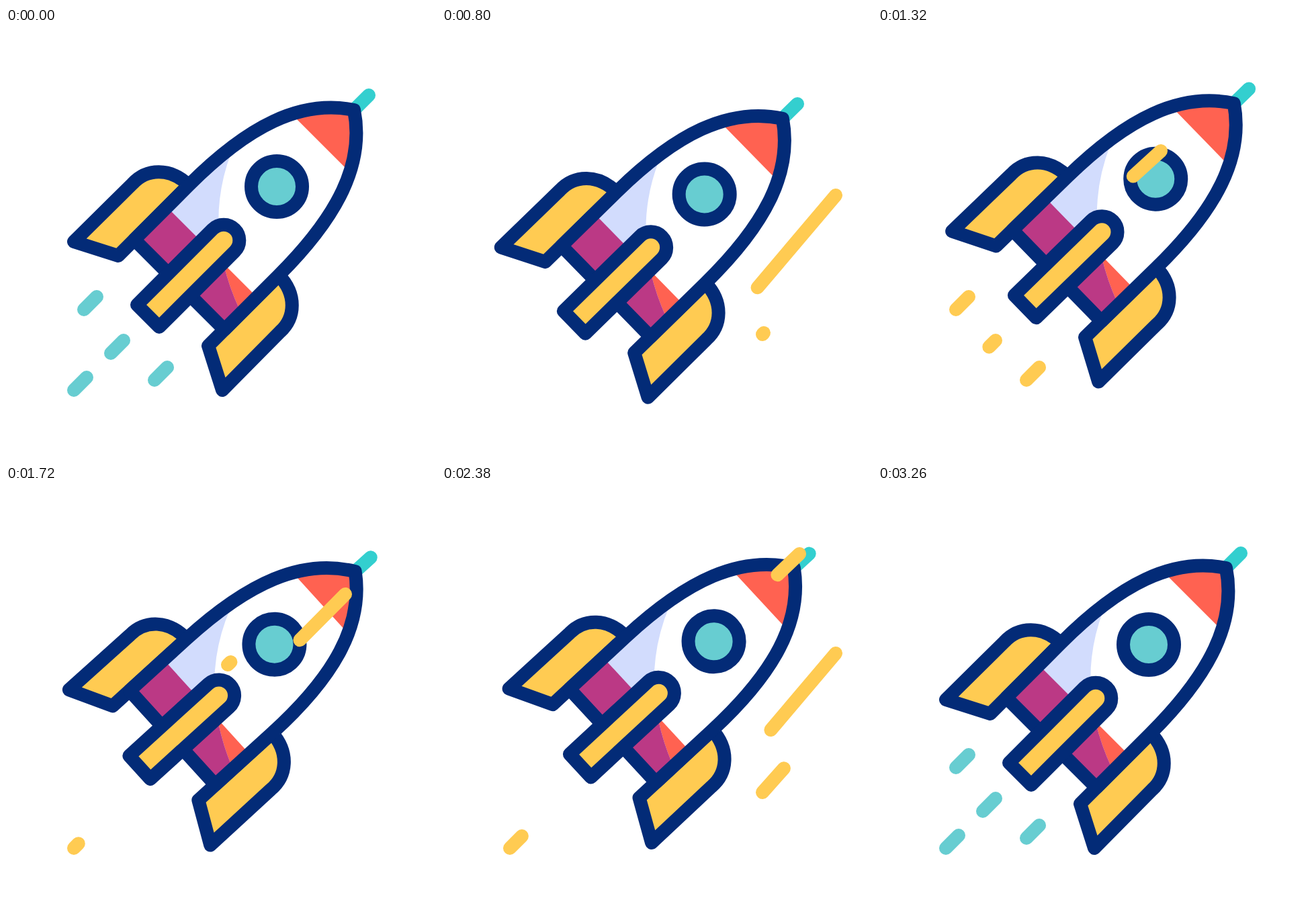
An HTML page for the animation above (3520 ms loop, 640 by 640 pixels).

```html
<!DOCTYPE html>
<html lang="en">
<head>
<meta charset="utf-8">
<title>Rocket</title>
<style>
  html, body { margin: 0; width: 100%; height: 100%; overflow: hidden; background: #fff; }
  svg { display: block; width: 100vw; height: 100vh; }
  .line { fill: none; stroke-width: 20; stroke-linecap: round; }
  .outline { stroke: #032b77; stroke-width: 20; stroke-linejoin: round; }
</style>
</head>
<body>
<svg viewBox="0 0 640 640">
  <defs>
    <path id="hull" d="M191 315L272 234C360 146 438 106 518 122C534 202 494 280 406 368L325 449Z"/>
    <path id="band" d="M140 167L440 467L360 520L100 300Z"/>
    <clipPath id="inHull"><use href="#hull"/></clipPath>
    <clipPath id="inShade"><path d="M335 186Q292 300 348 420V480H140V186Z"/></clipPath>
  </defs>
  <g id="rocket">
    <path class="line" stroke="#33cfcf" d="M512 128L540 100"/>
    <g class="outline" fill="#ffcb52">
      <path id="fin" d="M101 318L188 232C209 209 244 207 272 234L167 339Z"/>
      <use href="#fin" transform="matrix(0 -1 -1 0 640 640)"/>
    </g>
    <g clip-path="url(#inHull)">
      <path fill="#fff" d="M150 90H540V470H150Z"/>
      <path fill="#ff6251" d="M397 100L540 243V100Z"/>
      <use href="#band" fill="#ff6251"/>
      <g clip-path="url(#inShade)">
        <path fill="#d2dcfd" d="M140 180H360V480H140Z"/>
        <use href="#band" fill="#bb3985"/>
      </g>
    </g>
    <use href="#hull" class="outline" fill="none"/>
    <circle class="outline" fill="#67cdd1" cx="403" cy="236" r="38"/>
    <path class="outline" fill="#ffcb52" d="M195 412L307.5 299.5A23.3 23.3 0 0 1 340.5 332.5L228 445Z"/>
  </g>
  <g id="trails"></g>
</svg>
<script>
const LOOP = 3520, START = 310, STOP = 2990, SHAKE = 340;
const YELLOW = '#ffcb52', TEAL = '#67cdd1';
const rocket = document.getElementById('rocket');
const trails = document.getElementById('trails');
const clamp = v => Math.min(1, Math.max(0, v));
const smooth = v => { v = clamp(v); return v * v * (3 - 2 * v); };
const passes = [];

// A line grows down-left from (x, y), holds, then shrinks into its lower end.
function addPass(x, y, run, slope, start, grow, hold, color) {
  const el = document.createElementNS('http://www.w3.org/2000/svg', 'path');
  el.setAttribute('class', 'line');
  el.setAttribute('stroke', color);
  trails.append(el);
  passes.push({ el, x, y, run, slope, start, grow, hold });
}

function addDash(x, y, delay) {
  const add = (...timing) => addPass(x, y, 19, 1, ...timing);
  add(2620, 120, LOOP + 320 - 2740, TEAL);
  for (const t of [1200, 1930]) add(t + delay, 120, 144, YELLOW);
}

// Streaks fan out a little on either side of the rocket's axis.
function addStreak(x, y, run, ...starts) {
  const slope = 1 + 0.18 * Math.sin((x + y - 660) / 110);
  for (const t of starts) addPass(x, y, run, slope, t, 267, 0, YELLOW);
}

addDash(135, 400, 0);
addDash(240, 505, 0);
addDash(175, 465, 60);
addDash(120, 520, 180);

addStreak(551, 373, 74, 274, 1962);
addStreak(586, 249, 120, 542, 2166);
addStreak(421, 183, 91, 1200);
addStreak(505, 161, 105, 1549);
addStreak(532, 101, 44, 2183);
addStreak(410, 155, 190, 2565);

function drawPass({ el, x, y, run, slope, start, grow, hold }, t) {
  const s = (t - start + LOOP) % LOOP;
  const head = clamp(s / grow), tail = clamp((s - grow - hold) / grow);
  const at = k => `${x - run * k} ${y + run * slope * k}`;
  el.setAttribute('d', head > 0 && tail < 1 ? `M${at(tail)}L${at(head)}` : '');
}

function drawRocket(t) {
  const level = smooth((t - START) / 80) * smooth((STOP - t) / 130);
  const angle = lag => 2 * Math.PI * (t - START - lag) / SHAKE;
  const shift = -13 * Math.sin(angle(44)) * level;
  const a = angle(68);
  const tilt = (0.93 + 1.53 * Math.cos(a) + 0.4 * Math.cos(2 * a)) * level;
  rocket.setAttribute('transform', `translate(${shift} ${-shift}) rotate(${tilt} 445 195)`);
}

function frame() {
  const t = performance.now() % LOOP;
  drawRocket(t);
  for (const pass of passes) drawPass(pass, t);
  requestAnimationFrame(frame);
}
frame();
</script>
</body>
</html>
```
